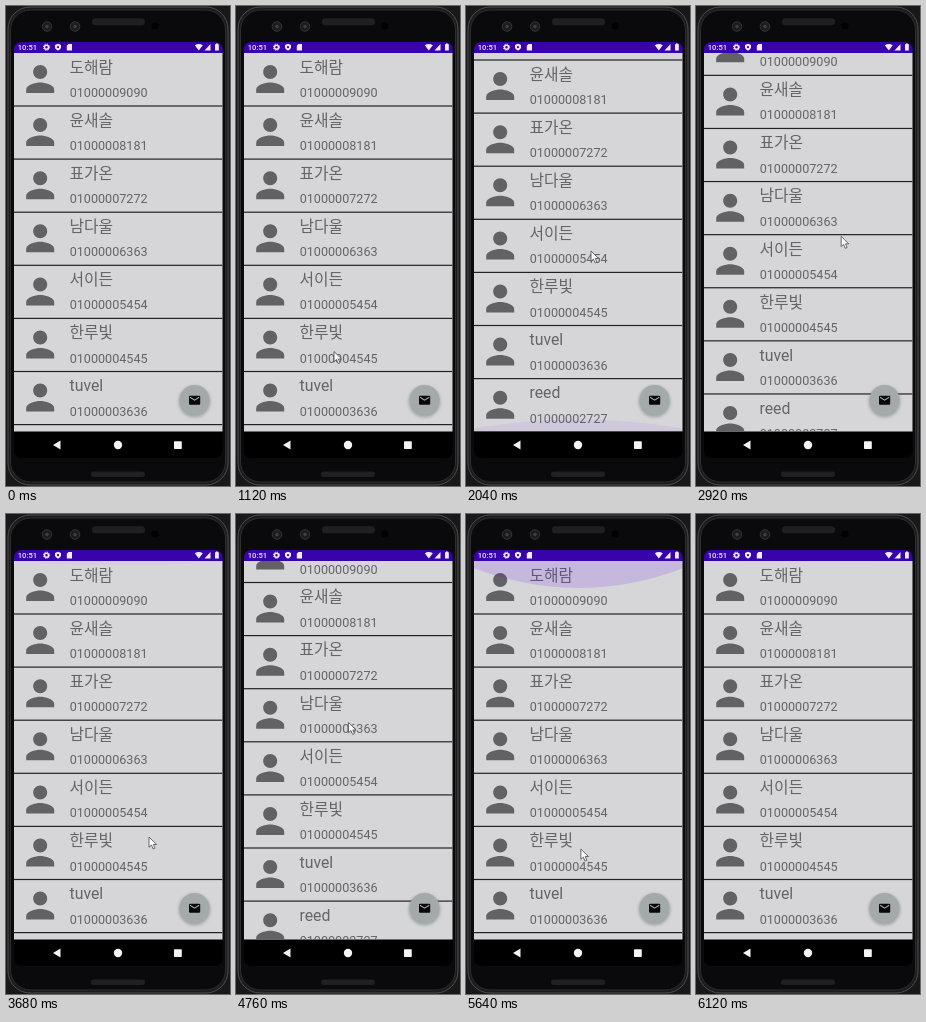
Write an HTML page that moves like this. It is 224 px wide and 480 px high and loops after 6.72 s.

```html
<!DOCTYPE html>
<html lang="ko">
<head>
<meta charset="utf-8">
<title>Contact list</title>
<style>
  html, body { margin: 0; width: 100%; height: 100%; overflow: hidden; background: #18181a; }
  svg { display: block; width: 224px; height: 480px; }
  text { font-family: Roboto, "Noto Sans CJK KR", "Noto Sans CJK", sans-serif; fill: #656467; }
  .name { font-size: 15.8px; }
  .phone { font-size: 12.6px; }
  .clock { font-size: 7.6px; font-weight: 500; fill: #f2effa; }
</style>
</head>
<body>
<svg viewBox="0 0 224 480" xmlns="http://www.w3.org/2000/svg">
  <defs>
    <clipPath id="screen"><path d="M8 426V44Q8 36 16 36H208Q216.500 36 216.500 44V426Z"/></clipPath>
    <clipPath id="list"><rect x="8" y="47" width="208.500" height="378.500"/></clipPath>
    <path id="person" d="M12 12c2.210 0 4-1.790 4-4s-1.790-4-4-4-4 1.790-4 4 1.790 4 4 4zm0 2c-2.670 0-8 1.340-8 4v2h16v-2c0-2.660-5.330-4-8-4z"/>
    <filter id="soft" x="-30%" y="-30%" width="160%" height="160%"><feGaussianBlur stdDeviation="1.800"/></filter>
  </defs>

  <!-- phone body -->
  <rect x="2" y="1" width="220" height="478" rx="22" fill="#1c1c1e" stroke="#4e4e51"/>
  <rect x="4.500" y="4" width="215" height="472" rx="20" fill="#0a0a0c" stroke="#2e2e30"/>
  <rect x="86" y="12.300" width="53" height="7" rx="3.500" fill="#202022"/>
  <rect x="85" y="465.500" width="54" height="5.500" rx="2.700" fill="#202022"/>
  <g fill="#1c1c1f" stroke="#343438">
    <circle cx="41" cy="20.500" r="4.800"/><circle cx="69" cy="20.500" r="4.800"/>
  </g>
  <g fill="#3c3d47">
    <circle cx="41" cy="20.500" r="1.800"/><circle cx="69" cy="20.500" r="1.800"/>
  </g>
  <circle cx="149" cy="20" r="3.500"/>
  <path d="M8 425H216.500V444Q216.500 452 208 452H16Q8 452 8 444Z"/>

  <!-- status bar -->
  <g clip-path="url(#screen)">
    <rect x="8" y="36" width="209" height="12" fill="#3903ab"/>
    <rect x="8" y="47" width="209" height="378.500" fill="#d6d5d8"/>
  </g>
  <g fill="#f2effa">
    <text class="clock" x="11.800" y="44">10:51</text>
    <circle cx="40.500" cy="41.200" r="2" fill="none" stroke="#f2effa" stroke-width="1.500"/>
    <circle cx="40.500" cy="41.200" r="3.100" fill="none" stroke="#f2effa" stroke-dasharray="1.300 1.130"/>
    <path d="M52 37.800l3 1.100v2.300q0 2.400-3 3.600-3-1.200-3-3.600v-2.300z"/>
    <circle cx="52" cy="41.200" r="1.100" fill="#3903ab"/>
    <path d="M62.500 38H66v6.500H60.800v-4.700z"/>
    <path d="M188.800 39.300Q192.800 36.500 196.800 39.300L192.800 44.500Z"/>
    <path d="M204.500 38v6.500H198.500Z"/>
    <path d="M209 38.300h1v-.8h1.800v.8h1v6.200H209z"/>
  </g>

  <g clip-path="url(#list)">
    <g id="rows"></g>
    <g fill="#6200ee"><path id="glowTop"/><path id="glowBottom"/></g>
  </g>

  <!-- mail button -->
  <circle cx="188.500" cy="395.500" r="15.800" fill="#657775" opacity=".5" filter="url(#soft)"/>
  <circle cx="188.500" cy="394" r="15" fill="#a3aaa9"/>
  <rect x="183" y="389.800" width="11.200" height="9" rx="1" fill="#080808"/>
  <path d="M184 391.200l4.600 2.900 4.600-2.900" fill="none" stroke="#a3aaa9" stroke-width="1.100"/>

  <!-- navigation -->
  <g fill="#f4f4f4">
    <path d="M47 439l7.500-4.500v9z"/>
    <circle cx="112" cy="439" r="4.200"/>
    <rect x="168" y="435.200" width="7.800" height="7.800" rx=".7"/>
  </g>

  <path id="cursor" d="M0 0V10.300L2.400 8.100 4.200 12 6 11.200 4.300 7.500H7.600Z" fill="#fafafa" stroke="#4b4b4d" stroke-width=".8" stroke-linejoin="round"/>
</svg>
<script>
const LOOP = 6720, STEP = 40, PITCH = 53.1;
const LEFT = 8, RIGHT = 216.5, TOP = 47, BOTTOM = 425.5;
const MAX_SCROLL = 46, SLOP = 8, FULL_PULL = 25, RECEDE = 600;
const $ = id => document.getElementById(id);
const clamp = (v, lo, hi) => Math.min(hi, Math.max(lo, v));

const names = ["도해람", "윤새솔", "표가온", "남다울", "서이든", "한루빛", "tuvel", "reed"];
$("rows").innerHTML = names.map((name, i) => `
  <g transform="translate(0 ${TOP + i * PITCH})">
    <use href="#person" transform="translate(13.2 5) scale(1.75)" fill="#626164"/>
    <text class="name" x="63.5" y="19.8">${name}</text>
    <text class="phone" x="63.7" y="44">0100000${`${9 - i}${i}`.repeat(2)}</text>
    <rect x="8" y="52.4" width="208.5" height="1.2" fill="#222224"/>
  </g>`).join("");

// The pointer rests between moves; a drag also pulls the list.
const entry = { x: 181, y: 457 };
const moves = [
  { from: 200, to: 640, x: 98, y: 345.5 },
  { from: 1120, to: 1840, x: 123, y: 238, drag: true },
  { from: 1840, to: 2040, x: 125, y: 245 },
  { from: 2040, to: 2520, x: 145, y: 207 },
  { from: 2780, to: 3320, x: 146, y: 347, drag: true },
  { from: 3440, to: 3680, x: 143, y: 323 },
  { from: 3680, to: 3880, x: 112, y: 238 },
  { from: 4080, to: 4240, x: 115, y: 248 },
  { from: 4400, to: 5120, x: 110, y: 169, drag: true },
  { from: 5240, to: 5680, x: 115, y: 339, drag: true }
];

function stateAt(t) {
  let { x, y } = entry, scroll = 0;
  const glow = { top: 0, bottom: 0 };
  for (const move of moves) {
    if (t < move.from) break;
    const p = clamp((t - move.from) / (move.to - move.from), 0, 1);
    const eased = p * p * (3 - 2 * p);
    const travel = (y - move.y) * eased;
    x += (move.x - x) * eased;
    y -= travel;
    if (!move.drag) continue;

    const wanted = scroll + Math.sign(travel) * Math.max(0, Math.abs(travel) - SLOP);
    scroll = clamp(wanted, 0, MAX_SCROLL);
    const pull = Math.min(1, Math.abs(wanted - scroll) / FULL_PULL);
    const fade = 1 - clamp((t - move.to) / RECEDE, 0, 1);
    if (pull) glow[wanted < 0 ? "top" : "bottom"] = pull * fade ** 2;
  }
  return { x, y, scroll, glow };
}

// The arc is a little wider than the list, so it is cut at both sides.
function drawGlow(el, edge, direction, amount) {
  const tip = edge + direction * 54 * amount;
  el.setAttribute("d", `M${LEFT - 18} ${edge}Q${(LEFT + RIGHT) / 2} ${tip} ${RIGHT + 18} ${edge}Z`);
  el.setAttribute("opacity", .14 * amount);
}

function draw(now) {
  const t = Math.floor(now % LOOP / STEP) * STEP;
  const { x, y, scroll, glow } = stateAt(t);
  $("rows").setAttribute("transform", `translate(0 ${-scroll})`);
  drawGlow($("glowTop"), TOP, 1, glow.top);
  drawGlow($("glowBottom"), BOTTOM, -1, glow.bottom);
  $("cursor").setAttribute("visibility", t >= moves[0].from && t < 6120 ? "visible" : "hidden");
  $("cursor").setAttribute("transform", `translate(${x} ${y})`);
}

function tick() {
  draw(performance.now());
  requestAnimationFrame(tick);
}
tick();
</script>
</body>
</html>
```
